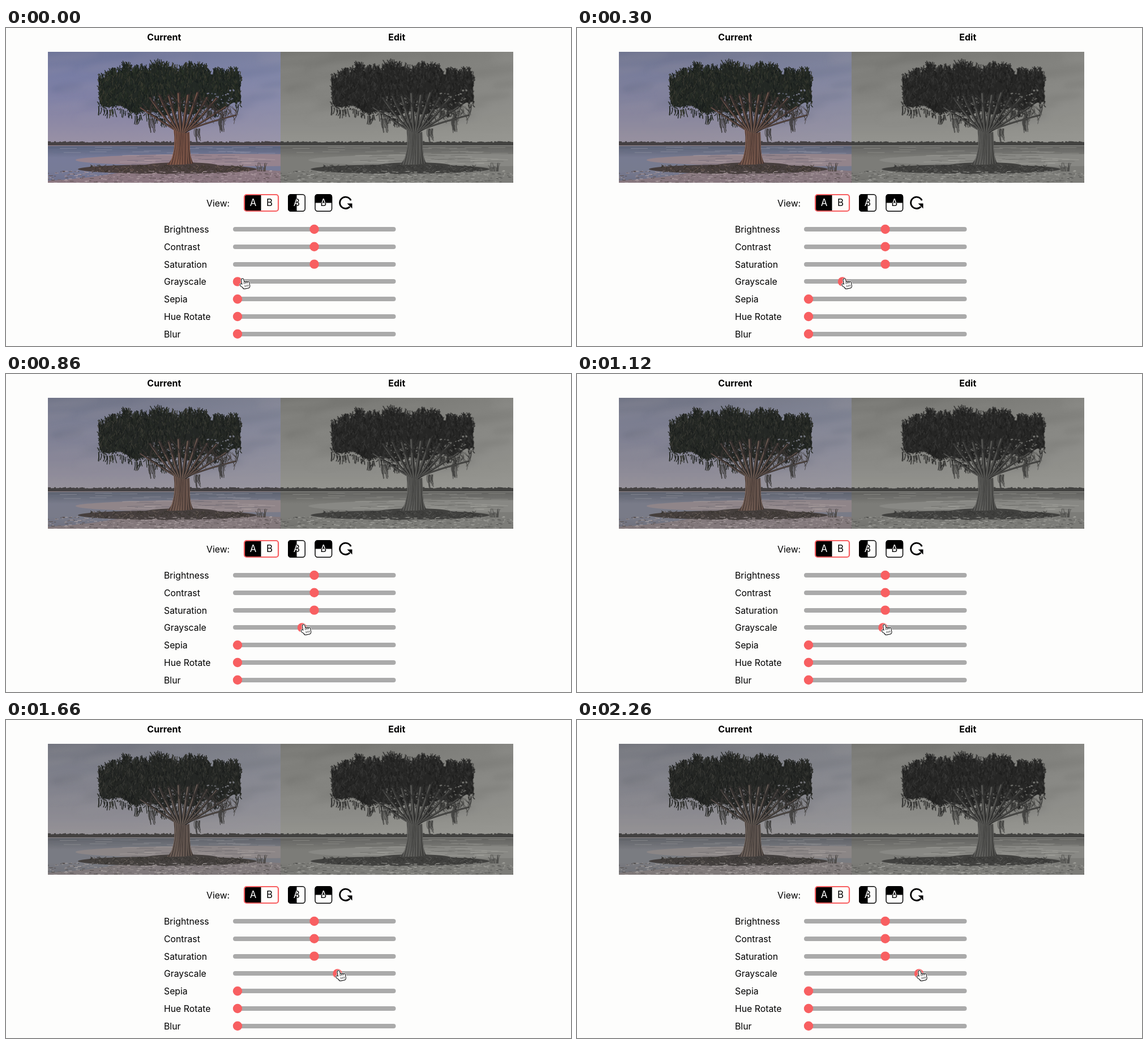
Recreate the animation shown at these times as an HTML page with a canvas. Size 998x561 px, loop 2280 ms.

```html
<!DOCTYPE html>
<html lang="en">
<head>
<meta charset="utf-8">
<title>Image filter sliders</title>
<style>
html, body { margin: 0; width: 100%; height: 100%; overflow: hidden; background: #fdfdfc; }
canvas { display: block; }
</style>
</head>
<body>
<canvas id="stage" width="998" height="561"></canvas>
<script>
const ctx = document.getElementById('stage').getContext('2d');
const LOOP = 2280;
const RED = '#f85f61';
const FONT = 'Inter, "Liberation Sans", sans-serif';
const PHOTO = { x: 73.5, y: 41.8, w: 411.3, h: 231.3 };
const LABELS = ['Brightness', 'Contrast', 'Saturation', 'Grayscale', 'Sepia', 'Hue Rotate', 'Blur'];
const GRAYSCALE = LABELS.indexOf('Grayscale');
const THUMB_MIN = 409, THUMB_RANGE = 271;

// Step and thumb position where the drag changes speed
const DRAG = [[0, 409], [7, 469], [19, 523], [29, 558], [35, 585.5], [49, 604]];

function randomFrom(seed) {
  return () => {
    seed = (seed * 1664525 + 1013904223) >>> 0;
    return seed / 4294967296;
  };
}

const rnd = randomFrom(71);
const between = (a, b) => a + (b - a) * rnd();
const pick = list => list[Math.floor(rnd() * list.length)];

function repeat(count, draw) {
  for (let i = 0; i < count; i++) draw(i);
}

function gradient(g, x0, y0, x1, y1, colors) {
  const fill = g.createLinearGradient(x0, y0, x1, y1);
  colors.forEach((c, i) => fill.addColorStop(i / (colors.length - 1), c));
  return fill;
}

function ellipse(g, color, x, y, rx, ry, tilt = 0) {
  g.fillStyle = color;
  g.beginPath();
  g.ellipse(x, y, rx, ry, tilt, 0, Math.PI * 2);
  g.fill();
}

function line(g, color, width, x0, y0, cx, cy, x1, y1) {
  g.strokeStyle = color;
  g.lineWidth = width;
  g.beginPath();
  g.moveTo(x0, y0);
  g.quadraticCurveTo(cx, cy, x1, y1);
  g.stroke();
}

function drawSky(g) {
  g.fillStyle = gradient(g, 0, 42, 0, 204, ['#6e7599', '#787da4', '#8182a6', '#8c88a5', '#9991a5']);
  g.fillRect(70, 38, 420, 168);
  g.filter = 'blur(5px)';
  repeat(34, i => {
    const color = i % 3 ? 'rgba(150,146,168,.22)' : 'rgba(82,92,130,.25)';
    ellipse(g, color, between(64, 494), between(42, 165), between(25, 70), between(3, 9), -0.12);
  });
  g.filter = 'none';
  g.fillStyle = gradient(g, 220, 0, 485, 0, ['rgba(155,160,180,0)', 'rgba(155,160,180,.3)']);
  g.fillRect(70, 38, 420, 168);
}

function drawShore(g) {
  g.fillStyle = gradient(g, 0, 206, 0, 274, ['#566079', '#777b99', '#777b97', '#6b6e8a']);
  g.fillRect(70, 206, 420, 70);
  g.fillStyle = '#464144';
  for (let x = 70; x < 490; x += 3) {
    const top = between(199.5, 202);
    g.fillRect(x, top, 3, 207 - top);
  }
  g.fillStyle = '#96838f';
  g.fillRect(70, 207, 420, 1.2);
  repeat(50, () => {
    const x = between(60, 450), y = between(210, 222);
    line(g, pick(['#67708d', '#888ba3']), 0.8, x, y, x + 15, y, x + 30, y);
  });

  ellipse(g, '#96838e', 400, 233, 277, 11);
  repeat(45, () => {
    const x = between(200, 450), y = between(224, 242);
    line(g, pick(['#7e7280', '#aa979e']), 1, x, y, x + 15, y - 1, x + 30, y);
  });

  g.fillStyle = '#8b7780';
  for (let x = 70; x < 490; x++) {
    const top = 262 - 22 * Math.exp(-(((x - 310) / 130) ** 2)) - (x - 310) * 0.035;
    g.fillRect(x, top, 1.5, 280 - top);
  }
  ellipse(g, '#4a3f3e', 285, 249, 158, 8);
  ellipse(g, '#4a3f3e', 310, 243, 65, 6);
  repeat(450, () => {
    g.fillStyle = pick(['#5d5051', '#a18e94', '#73656b', '#b5a4a9']);
    g.fillRect(between(70, 490), between(251, 274), between(1, 7), 1);
  });
  repeat(210, () => {
    const x = between(145, 430), y = between(244, 255);
    line(g, pick(['#383129', '#40382f', '#705d55']), 1, x, y, x + 2, y - 2, x + between(-6, 6), y - 3);
  });
  repeat(14, () => {
    const x = between(438, 458);
    line(g, '#4d453f', 0.9, x, 253, x, 245, x + between(-4, 4), between(236, 248));
  });
}

// Crown outline as a function of its width, from 0 to 1
const crownX = u => 163 + 252 * u;
const crownTop = u => 83 - 15 * Math.sin(Math.PI * u) + 4 * Math.sin(25 * u) + 3 * Math.sin(58 * u);
const crownBottom = u => 137 + 19 * Math.sin(Math.PI * u) + 4 * Math.sin(31 * u);

function leaf(g, x, y, length) {
  line(g, pick(['#20271f', '#2a3228', '#181e1d', '#393a2f', '#222722']), 1.3,
    x, y, x + 1, y - length / 2, x + between(-4, 4), y - length);
}

function drawCrown(g) {
  g.beginPath();
  for (let u = 0; u <= 1; u += 0.01) g.lineTo(crownX(u), crownTop(u) + 2);
  for (let u = 1; u >= 0; u -= 0.01) g.lineTo(crownX(u), crownBottom(u) - 5);
  g.closePath();
  g.fillStyle = '#232925';
  g.fill();
  repeat(1700, () => {
    const u = rnd();
    leaf(g, crownX(u), between(crownTop(u), crownBottom(u)), between(3, 9));
  });
  repeat(80, () => {
    const u = rnd(), x = crownX(u), y = crownTop(u);
    repeat(4, () => leaf(g, x + between(-3, 3), y + 3, between(4, 13)));
  });
  repeat(130, () => {
    const u = rnd();
    leaf(g, crownX(u), crownBottom(u), -between(2, 17));
  });
  repeat(110, () => {
    const u = between(0.38, 0.96);
    ellipse(g, pick(['#74778f', '#5d6274']), crownX(u), crownBottom(u) - between(0, 32), between(0.6, 2), 1.2);
  });
}

function drawBranches(g) {
  g.lineCap = 'round';
  for (let k = -0.85; k <= 1.05; k += 0.19) {
    const width = 6.5 - 3.5 * Math.abs(k);
    const x = 311 + 11 * k, y = 188 - 8 * Math.abs(k);
    const endX = 313 + 88 * k, endY = 116 + 29 * k * k + between(-6, 6);
    const midX = 311 + 43 * k, midY = 160 + 6 * Math.abs(k);
    line(g, '#352c2b', width, x, y, midX, midY, endX, endY);
    line(g, '#775649', width * 0.38, x - 1, y, midX - 1, midY, endX - 1, endY);
    repeat(5, () => {
      const bx = (midX + endX) / 2, by = (midY + endY) / 2;
      line(g, '#3b3230', 1.1, bx, by, bx + 5 * k, by - 8, bx + between(-18, 18), by - between(4, 28));
    });
  }
  repeat(55, () => {
    const x = between(340, 405), y = between(138, 155);
    line(g, '#49403f', 0.8, x, y, x + 6, y + 6, x + between(-6, 13), y + between(6, 15));
  });
  for (const mossX of [257, 337, 381]) {
    repeat(16, () => {
      const x = mossX + between(-5, 6), y = mossX === 337 ? 178 : 160;
      line(g, '#454244', 1, x, y, x - 2, y + 9, x + 1, y + between(10, 25));
    });
  }
}

function drawTrunk(g) {
  const trunk = new Path2D('M296 178Q300 207 294 226Q292 235 284 241Q307 242 331 239Q325 228 325 212L324 183Q311 190 296 178Z');
  g.fillStyle = gradient(g, 288, 0, 328, 0, ['#67443c', '#8e5f4c', '#744d41', '#493430']);
  g.fill(trunk);
  g.save();
  g.clip(trunk);
  repeat(30, i => {
    const x = 297 + i;
    line(g, i % 3 ? '#4f3833' : '#9a6b57', 0.9, x, 178, x + between(-2, 2), 213, 285 + i * 1.6, 242);
  });
  g.restore();
}

function makeLayer() {
  const layer = document.createElement('canvas');
  layer.width = 490;
  layer.height = 280;
  return layer;
}

function buildPhotos() {
  const color = makeLayer(), gray = makeLayer();
  const g = color.getContext('2d');
  [drawSky, drawShore, drawCrown, drawBranches, drawTrunk].forEach(draw => draw(g));
  const h = gray.getContext('2d');
  h.filter = 'grayscale(1)';
  h.drawImage(color, 0, 0);
  h.filter = 'none';
  h.globalCompositeOperation = 'multiply';
  h.fillStyle = '#fffff7';
  h.fillRect(70, 38, 420, 242);
  return { color, gray };
}

const photos = buildPhotos();

function drawPhoto(image, x, alpha = 1) {
  const { x: sx, y, w, h } = PHOTO;
  ctx.globalAlpha = alpha;
  ctx.drawImage(image, sx, y, w, h, x, y, w, h);
  ctx.globalAlpha = 1;
}

function text(value, x, y, { size = 15.8, color = '#000', align = 'left', weight = 400 } = {}) {
  ctx.font = `${weight} ${size}px ${FONT}`;
  ctx.textAlign = align;
  ctx.fillStyle = color;
  ctx.fillText(value, x, y);
}

function letter(value, x, color) {
  text(value, x, 314.3, { size: 16.8, color, align: 'center' });
}

function box(x, y, w, h, r) {
  ctx.beginPath();
  ctx.roundRect(x, y, w, h, r);
}

function clipped(x, y, w, h, draw) {
  ctx.save();
  ctx.beginPath();
  ctx.rect(x, y, w, h);
  ctx.clip();
  draw();
  ctx.restore();
}

function splitButton(x, vertical) {
  const size = 31, half = size / 2, top = 293;
  const [w, h] = vertical ? [half, size] : [size, half];
  clipped(x, top, w, h, () => {
    box(x, top, size, size, 5);
    ctx.fillStyle = '#000';
    ctx.fill();
    letter('A', x + half, '#fff');
  });
  clipped(vertical ? x + half : x, vertical ? top : top + half, w, h, () => letter('B', x + half, '#000'));
  box(x + 0.75, top + 0.75, size - 1.5, size - 1.5, 4.5);
  ctx.strokeStyle = '#000';
  ctx.lineWidth = 1.5;
  ctx.stroke();
}

function drawViewButtons() {
  text('View:', 354, 314.5);
  box(421, 294, 60, 29, 4);
  ctx.fillStyle = '#fffefb';
  ctx.fill();
  ctx.fillStyle = '#000';
  ctx.fillRect(422, 295, 28.5, 27);
  ctx.strokeStyle = RED;
  ctx.lineWidth = 2.2;
  ctx.stroke();
  letter('A', 436.5, '#fff');
  letter('B', 465.5, '#000');
  splitButton(498, true);
  splitButton(545.3, false);

  ctx.strokeStyle = ctx.fillStyle = '#000';
  ctx.lineWidth = 2.8;
  ctx.beginPath();
  ctx.arc(599.8, 308.3, 10.2, 0.75, -0.4);
  ctx.stroke();
  ctx.fill(new Path2D('M602.5 309.5H611.5V318.5Z'));
}

function drawSliders(thumbX) {
  LABELS.forEach((label, i) => {
    const y = 355 + 30.8 * i;
    const rest = THUMB_MIN + (i < GRAYSCALE ? THUMB_RANGE / 2 : 0);
    text(label, 279, y + 6);
    box(401, Math.round(y) - 4, 287.5, 8, 4);
    ctx.fillStyle = '#aaa';
    ctx.fill();
    ellipse(ctx, RED, i === GRAYSCALE ? thumbX : rest, y, 8.2, 8.2);
  });
}

function handShape() {
  const hand = new Path2D();
  hand.roundRect(-4.2, -9, 3.6, 13, 1.8);
  for (let i = 0; i < 3; i++) hand.roundRect(-1.2 + i * 2.8, -3 + i * 0.6, 3.4, 8, 1.7);
  hand.roundRect(-4.2, 0, 12, 8.5, 3);
  hand.ellipse(-5, 2.6, 4, 1.7, 0.8, 0, Math.PI * 2);
  return hand;
}

const hand = handShape();

function drawPointer(x) {
  ctx.save();
  ctx.translate(x - 0.5, 451);
  ctx.rotate(-0.2);
  for (const [color, width] of [['#fff', 3.6], ['#111', 2.2]]) {
    ctx.strokeStyle = color;
    ctx.lineWidth = width;
    ctx.stroke(hand);
  }
  ctx.fillStyle = '#fff';
  ctx.fill(hand);
  for (let i = 0; i < 3; i++) {
    const fx = -0.7 + i * 2.7;
    line(ctx, '#111', 0.9, fx, -2.5, fx, -1, fx, 0.5);
    line(ctx, '#111', 0.9, fx + 0.6, 3, fx + 0.6, 4, fx + 0.6, 6);
  }
  ctx.restore();
}

// Each 140 ms holds three poses: 20, 100 and 20 ms.
function stepAt(t) {
  const phase = t % 140;
  return 3 * Math.floor(t / 140) + (phase < 20 ? 0 : phase < 120 ? 1 : 2);
}

function thumbAt(step) {
  const next = Math.max(1, DRAG.findIndex(point => point[0] >= step));
  const [s0, x0] = DRAG[next - 1], [s1, x1] = DRAG[next];
  return x0 + (x1 - x0) * (step - s0) / (s1 - s0);
}

function render(t) {
  const step = stepAt(t);
  const thumbX = thumbAt(step);
  const pointerGap = 8 - step / 18 + 5 * Math.exp(-step);
  ctx.fillStyle = '#fdfdfc';
  ctx.fillRect(0, 0, 998, 561);
  const heading = { size: 16, align: 'center', weight: 700 };
  text('Current', 279.3, 22, heading);
  text('Edit', 690.3, 22, heading);
  drawPhoto(photos.color, PHOTO.x);
  drawPhoto(photos.gray, PHOTO.x, (thumbX - THUMB_MIN) / THUMB_RANGE);
  drawPhoto(photos.gray, PHOTO.x + PHOTO.w);
  drawViewButtons();
  drawSliders(thumbX);
  drawPointer(thumbX + pointerGap);
}

const start = performance.now();
function tick() {
  render((performance.now() - start) % LOOP);
  requestAnimationFrame(tick);
}
tick();
</script>
</body>
</html>
```
